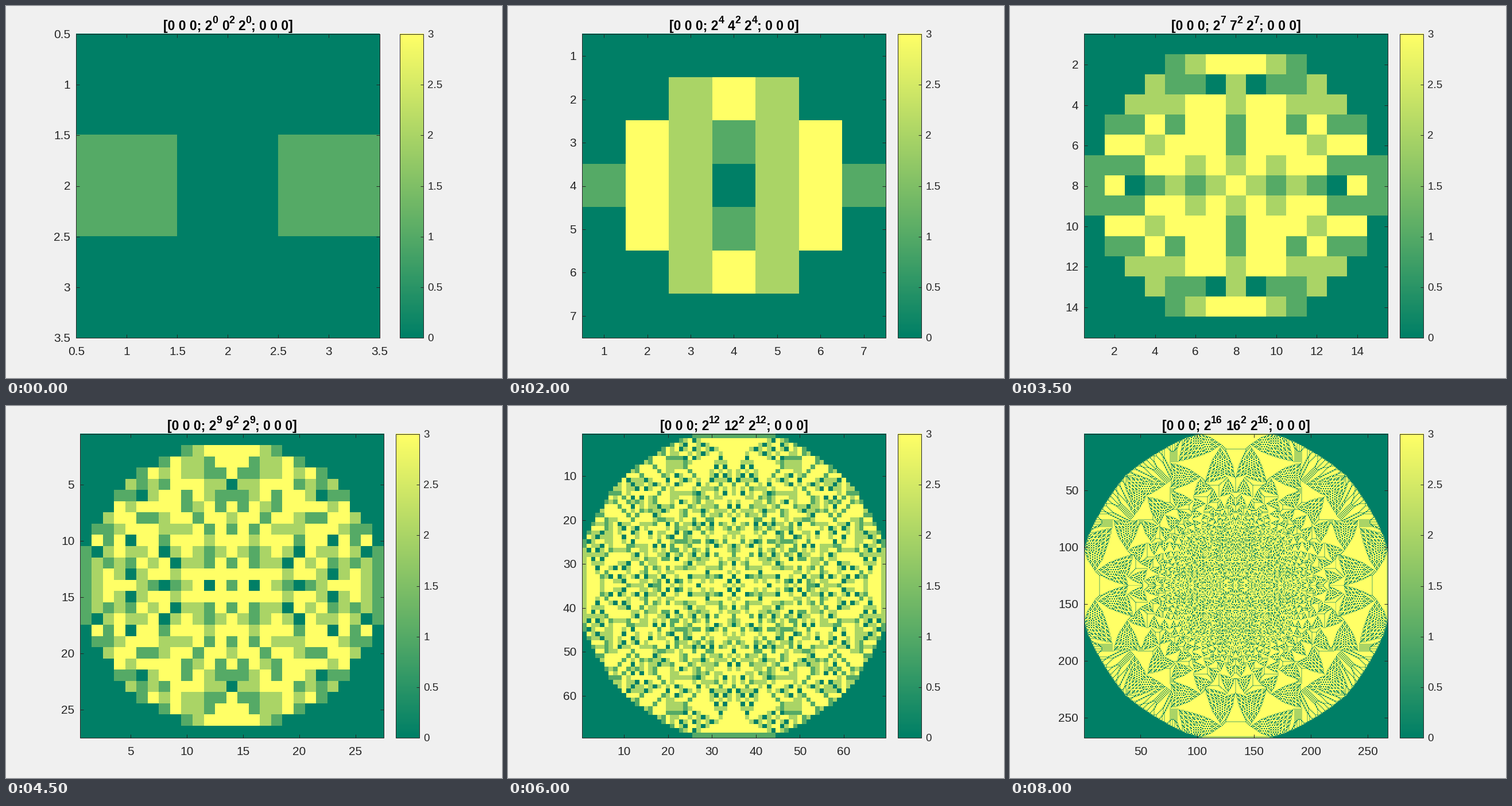
Write a matplotlib script that moves like this. It is 864x648 px and loops after 8.5 s.

```python
import math

import matplotlib.pyplot as plt
import numpy as np
from matplotlib.animation import FuncAnimation
from matplotlib.collections import LineCollection
from matplotlib.patches import Rectangle

W, H, DPI = 864, 648, 150
STEPS, INTERVAL = 17, 500
SIDE = 528.1                # plot edge length in pixels
LEFT, TOP = 129.4, 48.45
BOTTOM = TOP + SIDE
BAR_LEFT, BAR_WIDTH = 679.2, 41
INK = (0.15, 0.15, 0.15)
LINE = 72 / DPI             # one pixel in points
TICK_PT, BAR_PT, TITLE_PT, SUPER = 10, 9, 11, 0.77
TICK_LEN = 5.3
NICE_STEPS = (0.5, 1, 2, 5, 10, 20, 50, 100)
NARROW = {" ": 0.278, ".": 0.278, "[": 0.333, "]": 0.333, ";": 0.333}


def topple(quad):
    """Stabilise a doubly symmetric sandpile stored as one quadrant."""
    while (t := quad >> 2).any():
        quad &= 3
        quad[1:] += t[:-1]
        quad[:-1] += t[1:]
        quad[0] += t[1]
        quad[:, 1:] += t[:, :-1]
        quad[:, :-1] += t[:, 1:]
        quad[:, 0] += t[:, 1]
    return quad


def unfold(quad):
    half = max(1, *(int(i.max()) for i in np.nonzero(quad)))
    mirror = np.abs(np.arange(-half, half + 1))
    return quad[np.ix_(mirror, mirror)]


def make_piles():
    """Stable piles for 2^n, n^2, 2^n grains in a row.

    Toppling is abelian, so the two side sources are doubled from step to
    step and the centre grains are added afterwards.
    """
    piles = []
    sides = np.zeros((4, 4), np.uint16)
    sides[0, 1] = 1
    for n in range(STEPS):
        if n:
            size = int(0.4 * math.sqrt(2 ** (n + 1) + n * n)) + 4
            grown = np.zeros((size, size), np.uint16)
            k = min(size, len(sides))
            grown[:k, :k] = 2 * sides[:k, :k]
            sides = topple(grown)
        quad = sides.copy()
        quad[0, 0] += n * n
        piles.append(unfold(topple(quad)))
    return piles


def summer(v):
    v = np.asarray(v, float)
    return np.stack([v, 0.5 + v / 2, np.full_like(v, 0.4)], axis=-1)


def advance(s, pt):
    return sum(NARROW.get(c, 0.556) for c in s) * pt * DPI / 72


def label(x, y, s, pt, align=0.0, **kw):
    """Text with its baseline at y; align 0, 0.5, 1 is left, centre, right."""
    kw = {"color": INK, **kw}
    ax.text(x - align * advance(s, pt), y, s, fontsize=pt,
            family="Liberation Sans", ha="left", va="baseline", **kw)


def ticks_for(count, fits):
    """Finest nice tick spacing over [0.5, count + 0.5] that fits."""
    for step in NICE_STEPS:
        first = math.ceil(0.5 / step)
        last = math.floor((count + 0.5) / step)
        ticks = [i * step for i in range(first, last + 1)]
        widest = max(advance(f"{t:g}", TICK_PT) for t in ticks)
        if fits(step * SIDE / count, widest):
            return ticks


def draw_title(n, centre):
    parts = [("[0 0 0; 2", 0), (f"{n}", 1), (f" {n}", 0), ("2", 1),
             (" 2", 0), (f"{n}", 1), ("; 0 0 0]", 0)]
    sizes = [TITLE_PT * (SUPER if up else 1) for _, up in parts]
    x = centre - sum(advance(s, pt) for (s, _), pt in zip(parts, sizes)) / 2
    for (s, up), pt in zip(parts, sizes):
        word = s.lstrip()
        x += advance(" " * (len(s) - len(word)), pt)
        label(x, 30 if up else 42, word, pt, weight="bold", color="black")
        x += advance(word, pt)


def sample(start, length, count):
    """Whole pixels covering a span, and the cell under each pixel centre."""
    pixels = np.arange(round(start), round(start + length) + 1)
    cells = np.floor((pixels + 0.5 - start) / length * count).astype(int)
    return pixels, np.clip(cells, 0, count - 1)


def draw_cells(values, x, width):
    """Nearest-cell picture of values in 0..1 with a one pixel border."""
    rows, cols = values.shape
    px, col = sample(x, width, cols)
    py, row = sample(TOP, SIDE, rows)
    ax.imshow(summer(values[np.ix_(row, col)]), aspect="auto",
              extent=(px[0], px[-1] + 1, py[-1] + 1, py[0]),
              interpolation="nearest")
    # strokes snap to the row above their y, hence the + 1
    ax.add_patch(Rectangle((x, TOP + 1), width, SIDE, fill=False, ec=INK,
                           lw=LINE, snap=True, zorder=3))


def draw_plot(pile, left, xticks, yticks):
    count = len(pile)
    draw_cells(pile / 3, left, SIDE)
    marks = []
    right = left + SIDE
    for t in xticks:
        x = left + (t - 0.5) / count * SIDE
        marks += [[(x, TOP), (x, TOP + TICK_LEN)],
                  [(x, BOTTOM), (x, BOTTOM - TICK_LEN)]]
        label(x, 608, f"{t:g}", TICK_PT, 0.5)
    for t in yticks:
        y = TOP + (t - 0.5) / count * SIDE
        marks += [[(left, y), (left + TICK_LEN, y)],
                  [(right, y), (right - TICK_LEN, y)]]
        label(left - 10.3, y + 8, f"{t:g}", TICK_PT, 1)
    return marks


def draw_bar(x):
    draw_cells(np.linspace(1, 0, 256)[:, None], x, BAR_WIDTH)
    right = x + BAR_WIDTH
    marks = []
    for i in range(7):
        y = BOTTOM - i / 6 * SIDE
        marks.append([(right, y), (right - TICK_LEN, y)])
        label(right + 7, y + 7, f"{i / 2:g}", BAR_PT)
    return marks


def update(n):
    ax.clear()
    pile = piles[n]
    count = len(pile)
    xticks = ticks_for(count, lambda gap, width: gap - width > 28)
    yticks = ticks_for(count, lambda gap, width: gap > 50)

    # a last x label reaching past the plot pushes plot and bar apart
    to_edge = (count + 0.5 - xticks[-1]) / count * SIDE
    over = max(0, advance(f"{xticks[-1]:g}", TICK_PT) / 2 - to_edge)
    push = round(over / 2)
    left = LEFT - push

    marks = draw_plot(pile, left, xticks, yticks)
    marks += draw_bar(BAR_LEFT + push)
    ax.add_collection(LineCollection(np.array(marks) + [0, 1], colors=[INK],
                                     lw=LINE, snap=True, zorder=3))
    draw_title(n, left + SIDE / 2 + 0.5)
    ax.set_xlim(0, W)
    ax.set_ylim(H, 0)
    ax.axis("off")
    return []


piles = make_piles()
fig = plt.figure(figsize=(W / DPI, H / DPI), dpi=DPI, facecolor="#f0f0f0")
ax = fig.add_axes([0, 0, 1, 1])
anim = FuncAnimation(fig, update, frames=STEPS, interval=INTERVAL,
                     repeat=True, repeat_delay=0, blit=False)
plt.show()
```
